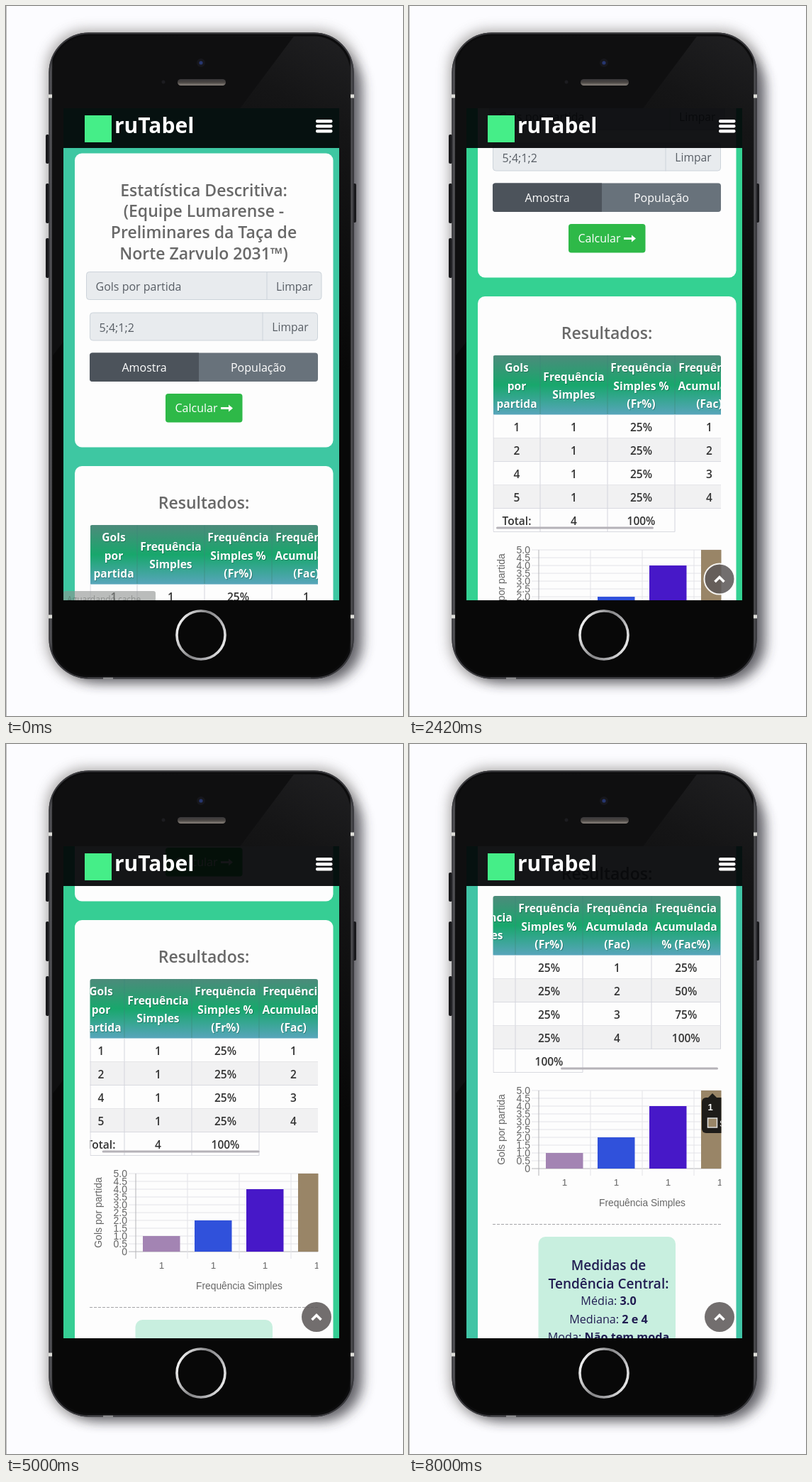
An HTML page for the animation above (8.08 s loop, 560 px wide and 1000 px high).

```html
<!DOCTYPE html>
<html lang="pt-BR">
<head>
<meta charset="utf-8">
<title>Estatística</title>
<style>
  html, body { margin: 0; width: 100%; height: 100%; overflow: hidden; background: #fcfcff; }
  svg { display: block; width: 100vw; height: 100vh; }
  text { font-family: "Open Sans", "Noto Sans", sans-serif; white-space: pre; }
  .chart text { font-family: "Liberation Sans", Arial, sans-serif; }
</style>
</head>
<body>
<svg viewBox="0 0 560 1000" xmlns="http://www.w3.org/2000/svg">
  <defs>
    <filter id="blur" x="-20%" y="-20%" width="140%" height="140%"><feGaussianBlur stdDeviation="9"/></filter>
    <linearGradient id="rim">
      <stop offset="0" stop-color="#2a2a2d"/><stop offset=".006" stop-color="#66666a"/>
      <stop offset=".013" stop-color="#0c0c0d"/><stop offset=".987" stop-color="#0c0c0d"/>
      <stop offset=".994" stop-color="#5c5c60"/><stop offset="1" stop-color="#1c1c20"/>
    </linearGradient>
    <linearGradient id="glass" x1="1" y1="0" x2=".75" y2="1">
      <stop offset="0" stop-color="#202022"/><stop offset=".14" stop-color="#151516"/>
      <stop offset=".5" stop-color="#080808"/>
    </linearGradient>
    <linearGradient id="ring" x1="0" y1=".3" x2="1" y2=".7">
      <stop offset="0" stop-color="#f4f4f4"/><stop offset=".45" stop-color="#858587"/>
      <stop offset=".7" stop-color="#a5a5a8"/><stop offset="1" stop-color="#ececec"/>
    </linearGradient>
    <linearGradient id="speaker" x2="0" y2="1">
      <stop offset="0" stop-color="#39373a"/><stop offset=".5" stop-color="#4a4643"/>
      <stop offset="1" stop-color="#8b847e"/>
    </linearGradient>
    <linearGradient id="head" x2="0" y2="1">
      <stop offset="0" stop-color="#4c8b7b"/><stop offset=".5" stop-color="#18a76c"/>
      <stop offset="1" stop-color="#58a5bb"/>
    </linearGradient>
    <clipPath id="body"><rect x="66" y="43" width="419" height="899" rx="51"/></clipPath>
    <clipPath id="screen"><rect x="81" y="144" width="389" height="693"/></clipPath>
    <clipPath id="inner"><rect x="118.5" y="700" width="322" height="900"/></clipPath>
    <clipPath id="tableBox"><rect x="118.5" y="731" width="321.5" height="250" rx="3"/></clipPath>
  </defs>
  <g id="phone"></g>
  <g clip-path="url(#screen)">
    <rect id="backdrop" x="81" y="144" width="389" height="693"/>
    <g id="page"></g>
    <g id="overlay"></g>
  </g>
</svg>
<script>
const LOOP = 8080, FRAMES = 97;
const $ = id => document.getElementById(id);

const rect = (x, y, w, h, fill, r = 0, more = '') =>
  `<rect x="${x}" y="${y}" width="${w}" height="${h}" rx="${r}" fill="${fill}" ${more}/>`;
const circle = (x, y, r, fill, more = '') =>
  `<circle cx="${x}" cy="${y}" r="${r}" fill="${fill}" ${more}/>`;
const path = (d, stroke, width = 1, more = '') =>
  `<path d="${d}" fill="none" stroke="${stroke}" stroke-width="${width}" ${more}/>`;
const text = (s, x, y, size, fill, weight = 400, anchor = 'middle', more = '') =>
  `<text x="${x}" y="${y}" font-size="${size}" fill="${fill}" font-weight="${weight}" text-anchor="${anchor}" ${more}>${s}</text>`;

function phone() {
  const notches = [127, 860].map(y =>
    rect(60, y - 2.5, 5, 5, '#deded9') + rect(486, y - 2.5, 5, 5, '#deded9')).join('');
  const buttons = [[56, 181, 41], [56, 250, 56], [56, 327, 56], [489, 250, 55]]
    .map(([x, y, h]) => rect(x, y, 5, h, '#19191c', 2)).join('');
  return rect(0, 0, 1, 1000, '#b8b8ba') +
    rect(57, 34, 438, 916, '#73716d', 56, 'opacity=".6" filter="url(#blur)"') +
    rect(76, 60, 427, 893, '#2f2f38', 56, 'opacity=".62" filter="url(#blur)"') +
    buttons +
    rect(60.5, 37.5, 430, 910, 'url(#rim)', 56) +
    rect(61.5, 38.5, 428, 908, 'none', 55, 'stroke="#3a3a3e" stroke-width="2"') +
    rect(65.5, 42.5, 420, 900, 'url(#glass)', 51) +
    '<path clip-path="url(#body)" d="M60 40H408L330 144L81 473L60 500Z" fill="#0f0f10"/>' +
    notches +
    path('M115 946.5H430', '#4a4a4e', 1.5) + path('M137 947H151', '#8a8a8c', 2.5) +
    circle(275, 80, 6, '#17171c') + circle(275, 80, 2.6, '#26366f') +
    circle(222, 107, 2.5, '#1c1c20') +
    rect(242, 103, 68, 9, 'url(#speaker)', 4.5) +
    circle(275, 886, 34, '#080808', 'stroke="url(#ring)" stroke-width="3.6"');
}

function field(x, y, w, split, value) {
  return rect(x + .5, y + .5, w - 1, 39, '#e8ebee', 4, 'stroke="#ccd3da"') +
    path(`M${split} ${y}v40`, '#ccd3da') +
    text(value, x + 13.5, y + 27, 16, '#585e65', 400, 'start') +
    text('Limpar', (split + x + w) / 2, y + 26.5, 15.7, '#585e65');
}

function form() {
  const title = ['Estatística Descritiva:', '(Equipe Lumarense -', 'Preliminares da Taça de', 'Norte Zarvulo 2031™)'];
  return rect(97, 207.5, 364.5, 414, '#fdfdfd', 10) +
    title.map((s, i) => text(s, 279, 267.5 + i * 29.8, 23, '#686868', 600)).join('') +
    field(113, 374, 332.5, 368, 'Gols por partida') +
    field(118, 431.5, 322, 362, '5;4;1;2') +
    rect(118, 488.5, 322, 40.5, '#68727b', 4) +
    '<path d="M272 488.5V529H122a4 4 0 0 1-4-4V492.5a4 4 0 0 1 4-4Z" fill="#4c535b"/>' +
    text('Amostra', 195, 515, 16, '#fff') + text('População', 356, 515, 16, '#fff') +
    rect(225, 546, 108.5, 40.5, '#2eb948', 4) +
    text('Calcular', 238.5, 572, 16, '#fff', 400, 'start') +
    path('M303 566.5H317', '#fff', 3) + '<path d="M314 561.5l6 5-6 5Z" fill="#fff"/>';
}

function table() {
  const edges = [119, 185, 280, 375, 472, 569.5];
  const mid = i => (edges[i] + edges[i + 1]) / 2;
  const heads = [['Gols', 'por', 'partida'], ['Frequência', 'Simples'], ['Frequência', 'Simples %', '(Fr%)'],
    ['Frequência', 'Acumulada', '(Fac)'], ['Frequência', 'Acumulada', '% (Fac%)']];
  const rows = [1, 2, 4, 5].map((goals, i) => [goals, 1, '25%', i + 1, (i + 1) * 25 + '%']);
  rows.push(['Total:', 4, '100%']);
  let out = rect(119, 731, 450.5, 83.5, 'url(#head)');
  heads.forEach((lines, c) => lines.forEach((s, i) => {
    const y = 779.5 + (i - (lines.length - 1) / 2) * 25.5;
    out += text(s, mid(c) + .8, y + 1, 15.6, '#0b3d3066', 700) + text(s, mid(c), y, 15.6, '#fff', 700);
  }));
  rows.forEach((row, r) => {
    const y = 814.5 + r * 33, right = edges[row.length];
    if (r % 2) out += rect(119, y, right - 119, 33, '#f1f1f2');
    out += path(`M119 ${y + 33}H${right}`, '#d9dae0');
    row.forEach((s, c) => {
      out += path(`M${edges[c + 1]} ${y}v33`, '#d3d4dc') + text(s, mid(c), y + 23, 15.5, '#333', 600);
    });
  });
  out += edges.slice(1, -1).map(x => path(`M${x} 731v83`, '#3d887b', 1, 'opacity=".6"')).join('');
  return `<g clip-path="url(#tableBox)"><g id="columns">${out}</g>` +
    path('M119 814V980', '#d3d4dc') + '</g>' +
    rect(123, 972.5, 222, 3, '#b5b2b8', 1.5, 'id="thumb"');
}

function chart() {
  const base = 1115, unit = 22;
  let out = '';
  for (let i = 0; i <= 10; i++) {
    const y = base - i * unit / 2;
    out += path(`M173 ${y}H440`, i ? '#e3e3e8' : '#b4b4b8') +
      text(i ? (i / 2).toFixed(1) : '0', 171, y + 4.5, 14, '#666', 400, 'end');
  }
  [[1, '#a384b3'], [2, '#3051db'], [4, '#4718c8'], [5, '#998567']].forEach(([value, color], i) => {
    const x = 183 + i * 73;
    out += path(`M${x} 1005V1125`, i ? '#e3e3e8' : '#b4b4b8') +
      rect(x + 10, base - value * unit, 52.5, value * unit, color) +
      text(1, x + 36.5, 1139, 13.5, '#666');
  });
  out += text('Frequência Simples', 329, 1167.5, 13.8, '#666') +
    text('Gols por partida', 0, 0, 14, '#666', 400, 'middle', 'transform="translate(135 1060) rotate(-90)"');
  const tip = '<g id="tip">' + rect(413, 1015, 80, 50, '#111', 6, 'opacity=".9"') +
    '<path d="M422 1015l6-6 6 6Z" fill="#111" opacity=".9"/>' +
    text(1, 425, 1032.5, 13, '#fff', 700) +
    rect(421.5, 1044, 13, 13, '#998567', 0, 'stroke="#ddd" stroke-width="1.5"') +
    text('Simples', 438, 1056, 13, '#fff', 400, 'start') + '</g>';
  return `<g class="chart" clip-path="url(#inner)">${out}${tip}</g>`;
}

function summary() {
  const ink = '#211d52';
  const stats = [['Média', '3.0'], ['Mediana', '2 e 4'], ['Moda', 'Não tem moda']];
  return path('M118 1193.5H440', '#a5a5a8', 1, 'stroke-dasharray="4 2"') +
    rect(182.5, 1211, 193.5, 260, '#c8efdf', 10) +
    text('Medidas de', 281.5, 1258, 19, ink, 600) +
    text('Tendência Central:', 281.5, 1283.5, 19, ink, 600) +
    stats.map(([name, value], i) => text(
      `${name}: <tspan font-weight="700">${value}</tspan>`, 281.5, 1307 + i * 25.5, 16.2, ink)).join('');
}

function overlay() {
  const bars = [160, 167, 174].map(y => rect(437, y, 23.5, 4.6, '#fff', 2)).join('');
  return rect(81, 144, 389, 56, '#020305', 0, 'opacity=".925"') +
    rect(111, 154, 38, 38, '#45ee88') +
    text('ruTabel', 153, 179, 30, '#fff', 700, 'start') + bars +
    '<g id="status">' + rect(81, 824, 130, 16, '#8e918f', 3, 'opacity=".8"') +
    text('Aguardando cache...', 86, 840, 12, '#686b69', 400, 'start') + '</g>' +
    '<g id="up">' + circle(438, 807, 21, '#5d5959', 'opacity=".87"') +
    circle(438, 807, 21.5, 'none', 'id="focus" stroke="#fff" stroke-width="2"') +
    path('M431.5 811L438 804.5L444.5 811', '#fff', 3.6) + '</g>';
}

// Linear interpolation through [time, value] stops.
function track(stops, t) {
  const i = stops.findIndex(([time]) => time > t);
  if (i < 0) return stops[stops.length - 1][1];
  if (i === 0) return stops[0][1];
  const [t0, a] = stops[i - 1], [t1, b] = stops[i];
  return a + (b - a) * (t - t0) / (t1 - t0);
}

const scrollY = [[250, 0], [1250, 109], [2416, 239], [3300, 400], [5880, 400], [6331, 482], [6900, 517]];
const scrollX = [[3330, 0], [3900, 130], [4300, 130], [4998, 18], [5160, 0], [5250, 0], [5830, 130]];
const tint = [
  [[0, 62], [1250, 53], [2416, 52], [5000, 54], [6330, 64]],
  [[0, 199], [1250, 207], [2416, 209], [5000, 206], [6330, 196]],
  [[0, 162], [1250, 152], [2416, 146], [5000, 148], [6330, 165]]
];

function render(time) {
  const frame = Math.floor((time % LOOP) / LOOP * FRAMES + .05);
  const t = frame * LOOP / FRAMES;
  const x = track(scrollX, t);
  $('backdrop').setAttribute('fill', `rgb(${tint.map(c => Math.round(track(c, t)))})`);
  $('page').setAttribute('transform', `translate(0 ${-track(scrollY, t)})`);
  $('columns').setAttribute('transform', `translate(${-x} 0)`);
  $('thumb').setAttribute('x', 123 + x * .7);
  $('status').setAttribute('opacity', track([[0, .75], [330, 0]], t));
  $('up').setAttribute('opacity', track([[2080, 0], [2330, 1]], t));
  $('focus').setAttribute('opacity', t < 2700 ? .9 : 0);
  $('tip').setAttribute('opacity', track([[7660, 0], [7910, 1]], t));
}

$('phone').innerHTML = phone();
$('page').innerHTML = form() + rect(97, 648, 364.5, 900, '#fdfdfd', 10) +
  text('Resultados:', 279, 708, 23, '#686868', 600) + table() + chart() + summary();
$('overlay').innerHTML = overlay();

const start = performance.now();
(function tick() {
  render(performance.now() - start);
  requestAnimationFrame(tick);
})();
</script>
</body>
</html>
```
